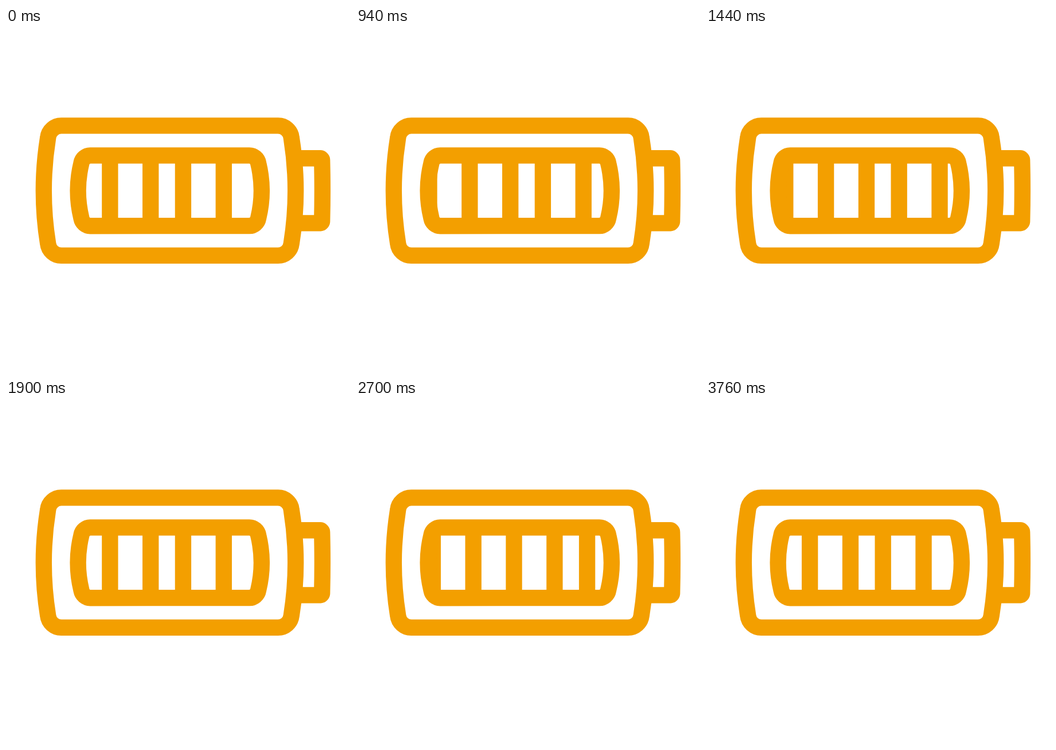
Write an HTML page that moves like this. It is 600 by 600 pixels and loops after 3820 ms.

```html
<!DOCTYPE html>
<html lang="en">
<head>
<meta charset="utf-8">
<title>Battery</title>
<style>
  html, body { margin: 0; width: 100%; height: 100%; overflow: hidden; background: #fff; }
  svg { display: block; width: 100vw; height: 100vh; }
  .line { fill: none; stroke: #f39f00; stroke-width: 28.35; }
  #bars { fill: #f39f00; }
</style>
</head>
<body>
<svg viewBox="0 0 600 600">
  <defs>
    <path id="cell" d="M147 222.4H424.5A16 16 0 0 1 440 235.5Q451.8 283.8 440 332A16 16 0 0 1 424.5 345.2H147A16 16 0 0 1 131.5 332Q119.7 283.8 131.5 235.5A16 16 0 0 1 147 222.4Z"/>
    <clipPath id="inside"><use href="#cell"/></clipPath>
  </defs>
  <g clip-path="url(#inside)"><g id="bars"></g></g>
  <use href="#cell" class="line"/>
  <path class="line" d="M505 227.2H548A3.5 3.5 0 0 1 551.2 231Q552.6 283.8 551.2 336.6A3.5 3.5 0 0 1 548 340.4H505"/>
  <path class="line" d="M97 170.4H474A23.5 23.5 0 0 1 497.8 191.5Q512.6 283.7 497.8 376A23.5 23.5 0 0 1 474 396.9H97A23.5 23.5 0 0 1 73.2 376Q58.4 283.7 73.2 191.5A23.5 23.5 0 0 1 97 170.4Z"/>
</svg>
<script>
  const LOOP = 3820, TICK = 20;
  const UNIT = 14.173;
  const PERIOD = 19 * UNIT;      // four bars, one of the gaps narrower
  const TRAVEL = 6 * PERIOD;
  const FIRST = 294.75;          // left edge of the bar after the narrow gap

  // time in ms, distance to the left, speed in px per ms
  const KEYS = [
    [0, 0, 0], [40, 0, 0], [470, 297, .96], [940, 790.9, 1.1], [1440, 1318.7, .96],
    [1870, TRAVEL, 0], [1940, TRAVEL, 0], [2320, 1370.8, -.93], [2700, 983, -1.1],
    [3160, 473.9, -1.05], [3340, 290, -.95], [3770, 0, 0], [LOOP, 0, 0]
  ];

  const bars = document.getElementById('bars');
  for (let group = -1; group < 3; group++) {
    for (let i = 0; i < 4; i++) {
      const bar = document.createElementNS('http://www.w3.org/2000/svg', 'rect');
      bar.setAttribute('x', FIRST + group * PERIOD + i * 5 * UNIT);
      bar.setAttribute('y', 220);
      bar.setAttribute('width', 2 * UNIT);
      bar.setAttribute('height', 128);
      bars.append(bar);
    }
  }

  // cubic Hermite through the keys
  function distance(t) {
    const i = Math.max(1, KEYS.findIndex(k => k[0] >= t));
    const [t0, d0, v0] = KEYS[i - 1], [t1, d1, v1] = KEYS[i];
    const h = t1 - t0, s = (t - t0) / h, r = 1 - s;
    return d0 + (d1 - d0) * s * s * (3 - 2 * s) + h * s * r * (v0 * r - v1 * s);
  }

  const start = performance.now();
  function draw(now) {
    const t = Math.max(0, now - start) + 2;
    const tick = Math.floor((t % LOOP) / TICK) * TICK;
    const shift = distance(tick) % PERIOD;
    bars.setAttribute('transform', `translate(${-shift.toFixed(2)} 0)`);
    requestAnimationFrame(draw);
  }
  draw(start);
</script>
</body>
</html>
```
